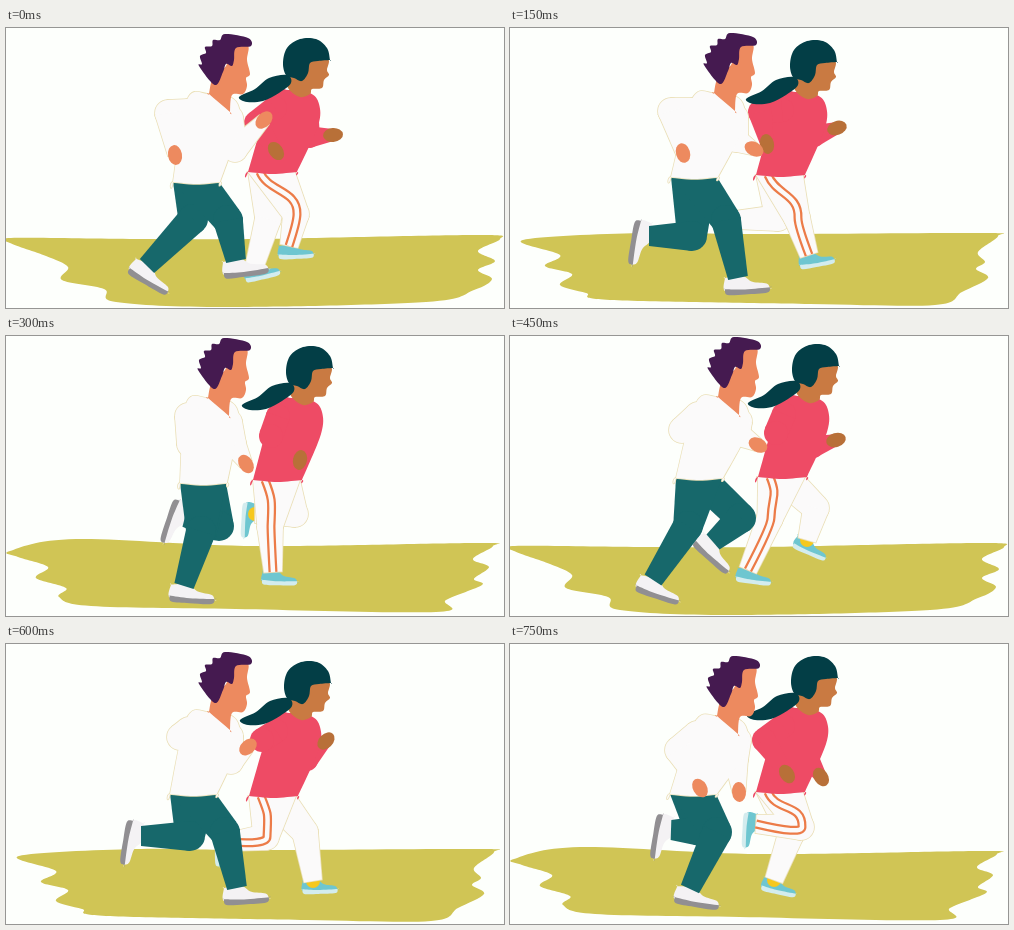
Recreate the animation shown at these times as an HTML page with a canvas. Size 498 by 280 pixels, loop 0.9 s.

```html
<!DOCTYPE html>
<html lang="en">
<head>
<meta charset="utf-8">
<title>Two runners</title>
<style>
  html, body { margin: 0; width: 100%; height: 100%; overflow: hidden; background: #fdfffc; }
  canvas { display: block; }
</style>
</head>
<body>
<canvas id="stage" width="498" height="280"></canvas>
<script>
const ctx = document.getElementById('stage').getContext('2d');
const STEP = 150;
const PAPER = '#fdfffc', GROUND = '#d0c555', CLOTH = '#fbfafa', EDGE = '#eadfb6';

// Smooth closed curve through "x y x y ..." points; a doubled point makes a corner.
function spline(text) {
  const n = text.split(' ').map(Number), p = [], path = new Path2D();
  for (let i = 0; i < n.length; i += 2) p.push([n[i], n[i + 1]]);
  const at = i => p[(i + p.length) % p.length];
  path.moveTo(...p[0]);
  p.forEach((b, i) => {
    const a = at(i - 1), c = at(i + 1), d = at(i + 2);
    path.bezierCurveTo(b[0] + (c[0] - a[0]) / 6, b[1] + (c[1] - a[1]) / 6,
      c[0] - (d[0] - b[0]) / 6, c[1] - (d[1] - b[1]) / 6, ...c);
  });
  return path;
}

// Strokes all parts first, so that only the outer outline stays visible.
function paint(parts, fill, edge) {
  if (edge) {
    ctx.strokeStyle = edge;
    ctx.lineWidth = 1.6;
    parts.forEach(part => ctx.stroke(part));
  }
  ctx.fillStyle = fill;
  parts.forEach(part => ctx.fill(part));
}

const blob = (text, fill) => paint([spline(text)], fill);

function polygon(...points) {
  const path = new Path2D();
  points.forEach(p => path.lineTo(...p));
  path.closePath();
  return path;
}

function disc([x, y], r) {
  const path = new Path2D();
  path.arc(x, y, r, 0, 7);
  return path;
}

// The two sides of a limb at point p when it runs from a to b.
function sides(a, b, p, r) {
  const angle = Math.atan2(b[1] - a[1], b[0] - a[0]);
  const dx = Math.sin(angle) * r, dy = -Math.cos(angle) * r;
  return [[p[0] + dx, p[1] + dy], [p[0] - dx, p[1] - dy]];
}

function bone(a, ra, b, rb) {
  const [a1, a2] = sides(a, b, a, ra), [b1, b2] = sides(a, b, b, rb);
  return polygon(a1, b1, b2, a2);
}

function leg(waist, width, knee, ankle, rk, ra) {
  const right = [waist[0] + width, waist[1]];
  const [k1, k2] = sides([waist[0] + width / 2, waist[1]], knee, knee, rk);
  return [polygon(right, k1, k2, waist), disc(knee, rk), bone(knee, rk, ankle, ra)];
}

function arm(shoulder, [ex, ey, wx, wy], r) {
  const elbow = [ex, ey];
  const parts = [disc(shoulder, r), bone(shoulder, r, elbow, r), disc(elbow, r)];
  if (wx) parts.push(bone(elbow, r, [wx, wy], r * 0.55));
  return parts;
}

function hand([ex, ey, wx, wy], color) {
  if (!wx) return;
  const path = new Path2D();
  path.ellipse(wx, wy, 10, 7, Math.atan2(wy - ey, wx - ex), 0, 7);
  paint([path], color);
}

function placed(x, y, degrees, scale, draw) {
  ctx.save();
  ctx.translate(x, y);
  ctx.rotate(degrees * Math.PI / 180);
  ctx.scale(scale, scale);
  draw();
  ctx.restore();
}

function shoe([, , x, y, degrees], scale, upper, sole) {
  placed(x, y, degrees, scale, () => {
    blob('-14 12 -13 -1 -13 -1 4 -2 14 5 28 8 31 13 31 13 6 15', upper);
    blob('-14 10 -14 10 6 12 31 12 31 12 28 17 6 17 -12 16', sole);
  });
}

// Double stripe along the outside of a leg.
function stripe([x, y], [kx, ky, ax, ay]) {
  const path = new Path2D();
  path.moveTo(x + 12, y);
  path.bezierCurveTo(x + 20, y + 20, kx + 2, ky - 24, kx + 1, ky);
  path.quadraticCurveTo(kx + 1, ky + 8, ax, ay);
  [['#ec7b48', 9], [CLOTH, 4.5]].forEach(([color, width]) => {
    ctx.strokeStyle = color;
    ctx.lineWidth = width;
    ctx.stroke(path);
  });
}

const grounds = [
  '5 210 130 211 250 211 470 207 494 211 472 223 489 233 472 242 486 251 468 262 420 274 220 279 110 274 98 261 56 252 62 239 40 228 4 215',
  '13 212 130 205 250 206 470 205 488 208 468 224 475 234 466 241 478 250 452 264 425 277 300 276 100 272 76 265 50 257 62 246 35 238 50 227',
  '4 215 70 203 250 210 470 207 487 210 467 223 483 231 468 243 476 249 440 264 430 276 230 273 85 270 53 261 60 252 30 242 42 231 12 221'
];

// head is an offset, waist its left end; arms hold elbow and wrist,
// legs hold knee, ankle and shoe angle. A hidden wrist is left out.
const men = [
  { head: [0, 0], waist: [167, 154], near: [162, 85, 169, 127], far: [229, 122, 258, 92],
    legs: [[187, 191, 141, 238, 29], [222, 192, 230, 233, -9]] },
  { head: [1, -1], waist: [161, 149], near: [161, 83, 173, 125], far: [226, 112, 244, 121],
    legs: [[182, 208, 139, 208, 98], [216, 192, 228, 250, -5]] },
  { head: [-1, -4], waist: [174, 147], near: [184, 108], far: [228, 108, 240, 128],
    legs: [[213, 190, 179, 181, 107], [195, 195, 178, 250, 2]] },
  { head: [5, -5], waist: [166, 142], near: [172, 94], far: [228, 98, 248, 109],
    legs: [[231, 182, 203, 206, 40], [178, 190, 143, 244, 17]] },
  { head: [0, 2], waist: [164, 150], near: [174, 93], far: [225, 118, 242, 103],
    legs: [[184, 192, 135, 192, 98], [219, 188, 231, 244, -5]] },
  { head: [4, 6], waist: [160, 150], near: [168, 106, 190, 144], far: [226, 115, 229, 148],
    legs: [[190, 187, 161, 186, 98], [207, 188, 180, 245, 8]] }
];

const women = [
  { head: [0, 0], waist: [242, 144], near: [250, 95, 270, 123], far: [303, 109, 327, 107],
    legs: [[262, 191, 248, 240, -15], [290, 186, 283, 218, -4]] },
  { head: [3, 2], waist: [246, 147], near: [250, 84, 257, 116], far: [304, 108, 327, 100],
    legs: [[268, 190, 225, 192, 90], [287, 190, 299, 227, -12]] },
  { head: [3, 0], waist: [247, 144], near: [265, 100], far: [298, 106, 294, 124],
    legs: [[289, 178, 249, 178, 92], [264, 190, 267, 236, 0]] },
  { head: [5, -2], waist: [248, 141], near: [266, 97], far: [303, 111, 326, 104],
    legs: [[306, 172, 297, 204, 22], [260, 182, 238, 234, 6]] },
  { head: [1, 7], waist: [243, 152], near: [256, 96], far: [301, 116, 320, 97],
    legs: [[299, 188, 307, 237, -3], [260, 193, 222, 198, 88]] },
  { head: [4, 2], waist: [246, 148], near: [254, 96, 277, 130], far: [298, 114, 311, 133],
    legs: [[281, 190, 264, 236, 11], [291, 183, 246, 180, 92]] }
];

function womanHead() {
  const skin = '#c97a42', hair = '#033e46';
  blob('304 28 322 31 321 42 323 47 318 52 316 60 306 61 304 66 294 69 282 60 284 48', skin);
  blob('281 47 263 50 249 61 233 69 241 74 257 73 273 65 285 55', hair);
  blob('280 47 277 35 281 20 294 11 310 11 321 20 324 32 324 32 312 33 304 35 302 45 296 53 288 50', hair);
}

function manHead() {
  blob('207 50 220 38 228 18 242 18 241 32 244 46 240 50 241 58 237 66 226 67 224 84 224 84 203 66 203 66', '#ed8a5f');
  blob('209 57 193 38 196 36 194 28 200 25 199 19 206 18 207 12 214 12 219 6 242 10 245 18 230 20 228 32 226 38 220 36 217 44', '#451a50');
}

function torso([x, y], [wx, wy], width, slope) {
  const right = `${wx + width} ${wy}`, left = `${wx} ${wy}`;
  return spline(`${x} ${y} ${x - slope} ${y + 6} ${left} ${left} ${wx + width / 2} ${wy + 2} ` +
    `${right} ${right} ${x + 29} ${y + 36} ${x + 30} ${y + 14} ${x + 21} ${y + 3}`);
}

function drawWoman({ head, waist, near, far, legs }) {
  const collar = [283 + head[0], 62 + head[1]], [x, y] = collar, handColor = '#b87038';
  legs.forEach((l, i) => {
    const knee = l.slice(0, 2), ankle = l.slice(2, 4);
    shoe(l, 0.78, '#6ec6d0', '#d3ecee');
    if (!i) paint([disc(ankle, 7)], '#f6c81e');
    paint(leg(waist, 47, knee, ankle, 13, 9), CLOTH, EDGE);
  });
  stripe(waist, legs[1]);
  paint([
    ...arm([x + 18, y + 18], far, 11),
    torso(collar, waist, 49, 17),
    ...arm([x - 14, y + 18], near, 12)
  ], '#ee4b65');
  hand(far, handColor);
  hand(near, handColor);
  placed(...head, 0, 1, womanHead);
}

function drawMan({ head, waist, near, far, legs }) {
  const collar = [203 + head[0], 66 + head[1]], [x, y] = collar, skin = '#ed8a5f';
  legs.forEach(l => shoe(l, 1, '#f4f2f4', '#918f92'));
  legs.forEach(l => paint(leg(waist, 46, l.slice(0, 2), l.slice(2, 4), 15, 10), '#17686b'));
  paint([
    ...arm([x + 22, y + 24], far, 12),
    torso(collar, waist, 47, 22),
    ...arm([x - 20, y + 18], near, 13)
  ], CLOTH, EDGE);
  hand(far, skin);
  hand(near, skin);
  placed(...head, 0, 1, manHead);
}

function frame(time) {
  const pose = Math.floor(time / STEP) % men.length;
  ctx.fillStyle = PAPER;
  ctx.fillRect(0, 0, 498, 280);
  blob(grounds[pose % grounds.length], GROUND);
  drawWoman(women[pose]);
  drawMan(men[pose]);
}

const start = performance.now();
function tick() {
  frame(performance.now() - start);
  requestAnimationFrame(tick);
}
tick();
</script>
</body>
</html>
```
